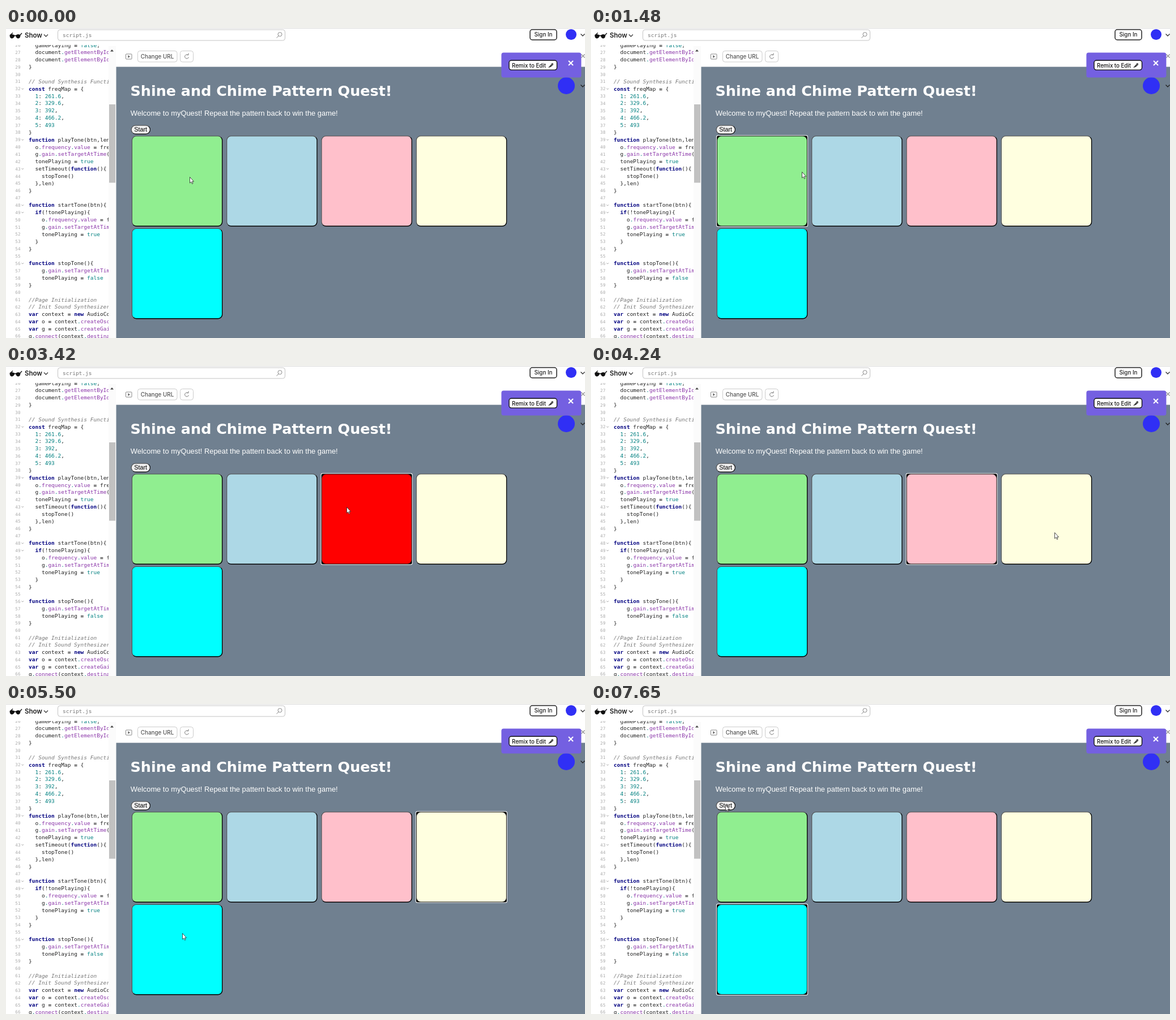
Write an HTML page that moves like this. It is 1022 px wide and 548 px high and loops after 8000 ms.

```html
<!DOCTYPE html>
<html lang="en">
<head>
<meta charset="utf-8">
<title>Memory game</title>
<style>
html, body { margin: 0; width: 100%; height: 100%; overflow: hidden; background: #fff; }
svg { display: block; width: 1022px; height: 548px; }
text { white-space: pre; }
.code { font: 9.5px "DejaVu Sans Mono", monospace; fill: #222; }
.kw { fill: #000080; font-weight: bold; }
.num { fill: #008080; }
.prop { fill: #8a35a8; }
.note { fill: #777; font-style: italic; }
.op { font-weight: bold; }
.line { font: 7.6px "DejaVu Sans Mono", monospace; fill: #aaa; text-anchor: end; }
.ui { font-family: Inter, sans-serif; font-weight: 500; }
.page { font-family: "Liberation Sans", Arial, sans-serif; }
</style>
</head>
<body>
<svg viewBox="0 0 1022 548">
  <defs>
    <linearGradient id="bevel" x2="1" y2="1">
      <stop offset=".5" stop-color="#4c4c4c"/><stop offset=".5" stop-color="#000"/>
    </linearGradient>
    <clipPath id="pane"><rect y="30" width="181" height="518"/></clipPath>
  </defs>
  <rect width="1022" height="548" fill="#fff"/>
  <g id="code" clip-path="url(#pane)"></g>

  <!-- editor scrollbar -->
  <rect x="181" y="32" width="13" height="516" fill="#fbfbfb"/>
  <path d="M184 41.500L187 38L190 41.500Z" fill="#444"/>
  <rect x="182" y="135" width="11" height="138.500" fill="#c1c1c1"/>

  <!-- top bar -->
  <rect width="1022" height="1" fill="#ddd"/>
  <g stroke="#111" fill="#111">
    <path d="M7 12.500Q11 10.500 15 13Q14 18 10 18Q7 18 7 12.500ZM17.500 13Q21 10.500 25 12.500Q25 18 21.500 18Q18 18 17.500 13Z"/>
    <path d="M7 13L12 8.500M15 13.500H18M24.500 13L28 9" fill="none" stroke-width="1.300"/>
  </g>
  <text class="ui" x="33" y="17.300" font-size="11.500" style="font-weight:600" fill="#222">Show</text>
  <path d="M67 11.500L70.500 15L74 11.500" fill="none" stroke="#444" stroke-width="1.400"/>
  <rect x="91.500" y="3" width="401" height="19" rx="4" fill="#fff" stroke="#c3c3c3"/>
  <text class="code" x="100" y="16.300" style="fill:#777">script.js</text>
  <g fill="none" stroke="#888">
    <circle cx="483.500" cy="11.200" r="3.500"/><path d="M481 14L477.500 17.500"/>
  </g>
  <rect x="925" y="2.800" width="47" height="18.200" rx="4" fill="#fff" stroke="#222" stroke-width="1.500"/>
  <text class="ui" x="948.500" y="15.300" font-size="9.800" text-anchor="middle" fill="#222">Sign In</text>
  <circle cx="997.500" cy="11.500" r="9.500" fill="#302ff5"/>
  <path d="M1014.500 10.500L1018 14L1021.500 10.500" fill="none" stroke="#333" stroke-width="1.300"/>

  <!-- preview toolbar -->
  <g fill="none" stroke="#ccc">
    <rect x="232.500" y="40.500" width="69.500" height="19.500" rx="4"/>
    <rect x="307.500" y="40.500" width="23" height="19.500" rx="4"/>
    <rect x="211.500" y="46" width="10.500" height="9" rx="1" stroke="#888"/>
    <path d="M321.500 48A3.500 3.500 0 1 0 322.500 51.500M319 47.500H322V44.500" stroke="#777"/>
    <path d="M1015.500 46.500L1021.500 52.500M1021.500 46.500L1015.500 52.500" stroke="#888" stroke-width="1.200"/>
  </g>
  <path d="M215.300 48V53L219 50.500Z" fill="#666"/>
  <text class="ui" x="267" y="53.700" font-size="9.900" text-anchor="middle" fill="#555">Change URL</text>

  <!-- page -->
  <rect x="194.500" y="68.600" width="828" height="480" fill="#708090"/>
  <text x="219.500" y="120.300" font-family="'DejaVu Sans', Verdana, sans-serif" font-weight="bold" font-size="25.450" fill="#fff">Shine and Chime Pattern Quest!</text>
  <text class="page" x="219.800" y="154.600" font-size="12.900" fill="#fff">Welcome to myQuest! Repeat the pattern back to win the game!</text>
  <rect x="221.200" y="172.200" width="33.200" height="15.200" rx="7.600" fill="#efefef" stroke="url(#bevel)" stroke-width="1.100"/>
  <text class="page" x="237.600" y="183.300" font-size="10.800" text-anchor="middle">Start</text>
  <g id="pads"></g>

  <!-- floating panel -->
  <circle cx="989" cy="102" r="15" fill="#302ff5"/>
  <path d="M1014.500 100.500L1018 104L1021.500 100.500" fill="none" stroke="#222" stroke-width="1.300"/>
  <rect x="874.400" y="43.600" width="141" height="43.800" rx="4" fill="#7460e1"/>
  <rect x="888" y="57.300" width="84.500" height="16.800" rx="4" fill="#fff" stroke="#111" stroke-width="1.400"/>
  <text class="ui" x="893" y="69.600" font-size="9.700" fill="#111">Remix to Edit</text>
  <path d="M958 70L963 64.500M960.500 69L965 65" stroke="#333" stroke-width="1.300"/>
  <circle cx="964.300" cy="64" r="1.900" fill="#555"/>
  <path d="M993 58L1001 66M1001 58L993 66" stroke="#fff" stroke-width="2"/>

  <path id="arrow" d="M.500 .500V11L2.800 8.900L4.500 12.500L6 11.800L4.500 8.300H7.500Z" fill="#fff" stroke="#222" stroke-width=".800"/>
  <path id="beam" d="M0 .500H5M2.500 .500V9.500M0 9.500H5" fill="none" stroke="#111"/>
</svg>
<script>
const LOOP = 8000;
const byId = id => document.getElementById(id);

function add(parent, tag, attrs, text) {
  const el = document.createElementNS("http://www.w3.org/2000/svg", tag);
  for (const key in attrs) el.setAttribute(key, attrs[key]);
  if (text !== undefined) el.textContent = text;
  parent.appendChild(el);
  return el;
}

// Editor text, first line is number 26
const code = `  gamePlaying = false;
  document.getElementById("startBtn")
  document.getElementById("stopBtn")
}

// Sound Synthesis Functions
const freqMap = {
  1: 261.6,
  2: 329.6,
  3: 392,
  4: 466.2,
  5: 493
}
function playTone(btn,len){
  o.frequency.value = freqMap[btn]
  g.gain.setTargetAtTime(volume)
  tonePlaying = true
  setTimeout(function(){
    stopTone()
  },len)
}

function startTone(btn){
  if(!tonePlaying){
    o.frequency.value = freqMap[btn]
    g.gain.setTargetAtTime(volume)
    tonePlaying = true
  }
}

function stopTone(){
    g.gain.setTargetAtTime(0)
    tonePlaying = false
}

//Page Initialization
// Init Sound Synthesizer
var context = new AudioContext()
var o = context.createOscillator()
var g = context.createGain()
g.connect(context.destination)`.split("\n");

const tokens = /(\/\/.*)|\b(const|function|if|var|new)\b|\b(true|false|[\d.]+)\b|(?<=\.)([a-zA-Z]+)|(=)|[a-zA-Z]+|[^a-zA-Z\d]/g;
const kinds = ["note", "kw", "num", "prop", "op"];

code.forEach((src, i) => {
  const y = 33.6 + i * 12.855;
  add(byId("code"), "text", { class: "line", x: 25.5, y: y - 0.4 }, 26 + i);
  const row = add(byId("code"), "text", { class: "code", x: 40, y });
  for (const m of src.matchAll(tokens)) {
    const kind = kinds.find((_, k) => m[k + 1]);
    add(row, "tspan", kind ? { class: kind } : {}, m[0]);
  }
  if (/\{$/.test(src))
    add(byId("code"), "path", {
      d: `M27.500 ${y - 4}l1.800 1.800l1.800 -1.800`, fill: "none", stroke: "#888", "stroke-width": 0.8
    });
});

// Game pads: idle and pressed colours
const pads = [
  ["lightgreen", "green"], ["lightblue", "blue"], ["pink", "red"],
  ["lightyellow", "yellow"], ["cyan", "darkcyan"]
].map(([idle, lit], i) => {
  const x = 222 + (i % 4) * 167.3;
  const y = 190.6 + Math.floor(i / 4) * 163.5;
  const group = add(byId("pads"), "g", {});
  const square = (inset, size, rx, fill, parent = group) =>
    add(parent, "rect", { x: x + inset, y: y + inset, width: size, height: size, rx, fill });
  square(0, 160.3, 8, "url(#bevel)");
  const ring = add(group, "g", {});
  square(-1, 162, 3, "#fff", ring);
  square(0, 160, 2.5, "#000", ring);
  const face = square(1, 158, 7, idle);
  return { idle, lit, ring, face };
});

// [time, focused pad, pressed]
const focus = [
  [0, -1, 0], [290, 0, 1], [490, 0, 0], [2310, 1, 0], [3420, 2, 1], [3550, 2, 0],
  [4680, 3, 1], [4830, 3, 0], [6030, 4, 1], [6190, 4, 0]
];

// [time, x, y, text cursor]
const pointer = [
  [0, 324, 263], [1480, 372, 254], [1610, 442, 250], [1750, 447, 250],
  [2710, 469, 250], [2860, 600, 249], [3000, 601, 249], [3830, 620, 249.5],
  [3970, 732, 272], [4090, 812, 294], [4240, 818, 294],
  [5110, 720, 312], [5235, 450, 372], [5360, 316, 410], [5500, 311, 405],
  [6810, 250, 223], [6950, 240, 150, 1], [7100, 236, 138, 1], [7220, 237, 150, 1],
  [7370, 237, 165], [7490, 237, 176], [7650, 237, 178]
];

const at = (steps, t) => steps.findLast(step => step[0] <= t);

function draw(t) {
  const [, active, pressed] = at(focus, t);
  pads.forEach((pad, i) => {
    const on = i === active;
    pad.ring.style.display = on ? "" : "none";
    pad.face.setAttribute("fill", on && pressed ? pad.lit : pad.idle);
  });
  const [, x, y, typing] = at(pointer, t);
  for (const [id, shown] of [["arrow", !typing], ["beam", typing]]) {
    byId(id).style.display = shown ? "" : "none";
    byId(id).setAttribute("transform", `translate(${x} ${y})`);
  }
}

const start = performance.now();
function tick() {
  draw((performance.now() - start) % LOOP);
  requestAnimationFrame(tick);
}
tick();
</script>
</body>
</html>
```
